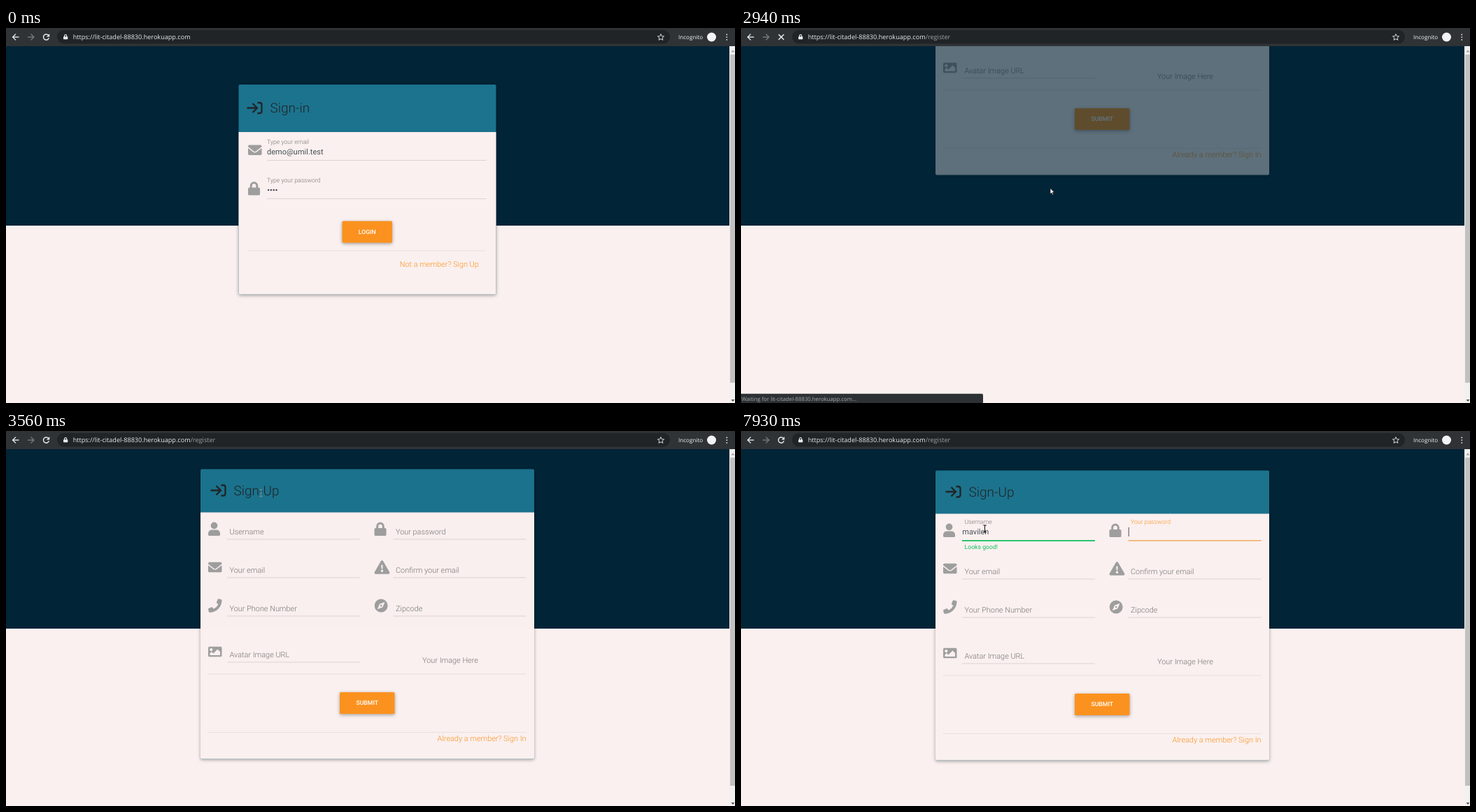
Recreate the animation shown at these times as an HTML page with a canvas. Size 1042 px wide and 537 px high, loop 8000 ms.

```html
<!DOCTYPE html>
<html lang="en">
<head>
<meta charset="utf-8">
<title>Sign-up demo</title>
<style>
html, body { margin: 0; width: 100%; height: 100%; overflow: hidden; background: #faf0ef; }
canvas { display: block; }
</style>
</head>
<body>
<canvas id="stage" width="1042" height="537"></canvas>
<script>
const W = 1042, H = 537, LOOP = 8000;
const stage = document.getElementById('stage').getContext('2d');
const layer = Object.assign(document.createElement('canvas'), { width: W, height: H });
const sheet = layer.getContext('2d');

const NAVY = '#022437', PALE = '#faf0ef', TEAL = '#1c738d', ORANGE = '#fb921f';
const GREY = '#757575', ICON = '#9e9e9e', INK = '#495057', GREEN = '#12c05f';
const HAIR = '#e8e0df';
const UI = '"Open Sans", "Noto Sans", sans-serif';
const HOST = 'lit-citadel-88830.herokuapp.com';
const USER = 'mavilen';
const KEYS = [5780, 6610, 6840, 6930, 7070, 7150, 7300];

const ICONS = {
  user: 'M3.75 5a5 5 0 1 0 10 0a5 5 0 1 0-10 0ZM0 18.1V16.4A5.2 5.2 0 0 1 5.2 11.2H12.3A5.2 5.2 0 0 1 17.5 16.4V18.1A1.9 1.9 0 0 1 15.6 20H1.9A1.9 1.9 0 0 1 0 18.1Z',
  lock: 'M0 10.6A1.9 1.9 0 0 1 1.9 8.75H2.8V6a5.95 5.95 0 0 1 11.9 0V8.75H15.6A1.9 1.9 0 0 1 17.5 10.6V18.1A1.9 1.9 0 0 1 15.6 20H1.9A1.9 1.9 0 0 1 0 18.1ZM5.9 8.75H11.6V6a2.85 2.85 0 0 0-5.7 0Z',
  mail: 'M0 4.4A1.9 1.9 0 0 1 1.9 2.5H18.1A1.9 1.9 0 0 1 20 4.4V5.2L11.6 11.8Q10 13 8.4 11.8L0 5.2ZM0 7.2L7.6 13Q10 14.6 12.4 13L20 7.2V15.6A1.9 1.9 0 0 1 18.1 17.5H1.9A1.9 1.9 0 0 1 0 15.6Z',
  warn: 'M9.6 .95A1.9 1.9 0 0 1 12.9 .95L22.2 17.2A1.9 1.9 0 0 1 20.6 20H1.9A1.9 1.9 0 0 1 .3 17.2ZM10 6.6H12.5L12.1 12.6H10.4ZM9.5 15.3a1.75 1.75 0 1 0 3.5 0a1.75 1.75 0 1 0-3.5 0Z',
  phone: 'M19.3 1L15.2 .05A.95 .95 0 0 0 14.1 .6L12.2 5A.94 .94 0 0 0 12.5 6.1L14.9 8A14.5 14.5 0 0 1 8 14.9L6.1 12.5A.94 .94 0 0 0 5 12.2L.6 14.1A.95 .95 0 0 0 .05 15.2L1 19.3A.94 .94 0 0 0 1.9 20A18.1 18.1 0 0 0 20 1.9A.94 .94 0 0 0 19.3 1Z',
  compass: 'M0 10a9.7 9.7 0 1 0 19.4 0a9.7 9.7 0 1 0-19.4 0ZM15.2 4.6L12 12.2L4.2 15.4L7.4 7.6ZM8.4 10a1.3 1.3 0 1 0 2.6 0a1.3 1.3 0 1 0-2.6 0Z',
  image: 'M1.9 2.5H18.1A1.9 1.9 0 0 1 20 4.4V15.6A1.9 1.9 0 0 1 18.1 17.5H1.9A1.9 1.9 0 0 1 0 15.6V4.4A1.9 1.9 0 0 1 1.9 2.5ZM2.2 6.9a2.2 2.2 0 1 0 4.4 0a2.2 2.2 0 1 0-4.4 0ZM2.5 15V12.5L5 10L7.5 12.5L13.75 6.25L17.5 10V15Z',
  arrow: 'M0 0V8.3L2 6.5L3.3 9.5L4.6 8.9L3.3 6H6Z',
  hand: 'M3 6.8V1.2a1 1 0 0 1 2 0V4.8l3.6 .8q1 .3 1 1.4V9.2L8.4 12.5H3.6L.5 8.2q-.4-1 .8-1.2Z',
  star: 'M0-4.6L1.3-1.5L4.6-1.3L2.1 .9L2.9 4.1L0 2.4L-2.9 4.1L-2.1 .9L-4.6-1.3L-1.3-1.5Z',
  enter: 'M0 9H14.5M8 2.5L14.5 9L8 15.5M15 1.5H18Q21 1.5 21 4.5V13.5Q21 16.5 18 16.5H15'
};
for (const k in ICONS) ICONS[k] = new Path2D(ICONS[k]);

const clamp = v => Math.max(0, Math.min(1, v));
const ramp = (t, from, span) => clamp((t - from) / span);
const mix = (a, b, k) => a + (b - a) * k;

// Progress in n hard steps from time a to time b.
const steps = (t, a, b, n) => clamp(Math.floor((t - a) / (b - a) * (n - 1) + 1e-6) / (n - 1));

// cubic-bezier(.25, .1, .25, 1)
function ease(x) {
  const at = (u, p, q) => 3 * u * (1 - u) ** 2 * p + 3 * u * u * (1 - u) * q + u ** 3;
  let lo = 0, hi = 1;
  for (let i = 0; i < 24; i++) {
    const mid = (lo + hi) / 2;
    if (at(mid, .25, .25) < x) lo = mid; else hi = mid;
  }
  return at(lo, .1, 1);
}

function text(g, s, x, y, size, color, weight = 300, align = 'left', family = 'Roboto, sans-serif') {
  g.font = `${weight} ${size}px ${family}`;
  g.textRendering = 'geometricPrecision';
  g.textAlign = align;
  g.fillStyle = color;
  g.fillText(s, x, y);
}

const ui = (s, x, y, size, color) => text(stage, s, x, y, size, color, 400, 'left', UI);

function box(g, x, y, w, h, color, r = 0) {
  g.fillStyle = color;
  g.beginPath();
  g.roundRect(x, y, w, h, r);
  g.fill();
}

function raised(g, x, y, w, h, color, r, blur = 5, alpha = .35) {
  g.save();
  g.shadowColor = `rgba(0,0,0,${alpha})`;
  g.shadowBlur = blur;
  g.shadowOffsetY = 1.4;
  box(g, x, y, w, h, color, r);
  g.restore();
}

function line(g, color, width, ...pts) {
  g.strokeStyle = color;
  g.lineWidth = width;
  g.beginPath();
  for (let i = 0; i < pts.length; i += 2) g.lineTo(pts[i], pts[i + 1]);
  g.stroke();
}

function icon(g, name, x, y, fill = ICON, stroke = null, width = 1, scale = .975) {
  g.save();
  g.translate(x, y);
  g.scale(scale, scale);
  if (fill) { g.fillStyle = fill; g.fill(ICONS[name], 'evenodd'); }
  if (stroke) { g.strokeStyle = stroke; g.lineWidth = width; g.stroke(ICONS[name]); }
  g.restore();
}

const rule = (g, x, y, w, color = '#dcd5d4') => box(g, x, y, w, 1, color);

function label(g, s, x, y, up, color) {
  text(g, s, x, y - mix(7, 24, up), mix(10.9, 8.7, up), color);
}

function card(g, x, y, w, h, head, title, titleX) {
  raised(g, x, y, w, h, TEAL, 2);
  box(g, x, y + head, w, h - head, PALE, [0, 0, 2, 2]);
  const mid = y + head / 2;
  icon(g, 'enter', titleX - 33, mid - 9.5, null, '#212529', 2.3, 1);
  text(g, title, titleX, mid + 6, 19, '#212529');
}

function button(g, s, x, y, w) {
  raised(g, x, y, w, 31, ORANGE, 1.5);
  text(g, s, x + w / 2, y + 18.4, 8.7, '#fff', 500, 'center');
}

function signIn(g, t) {
  card(g, 332.5, 81, 368, 300.5, 68, 'Sign-in', 377.5);
  icon(g, 'mail', 346, 165);
  icon(g, 'lock', 346, 220);
  label(g, 'Type your email', 373, 189.5, 1, GREY);
  text(g, 'demo@umil.test', 373, 181, 11, INK, 400);
  label(g, 'Type your password', 373, 244.5, 1, GREY);
  for (let i = 0; i < 4; i++) box(g, 373.8 + i * 3.8, 230.7, 2.6, 2.6, INK, 1.3);
  rule(g, 373, 189, 313.5);
  rule(g, 373, 244, 313.5);
  button(g, 'LOGIN', 480.5, 276.5, 71.5);
  rule(g, 346, 318.5, 340, HAIR);
  text(g, 'Not a member? Sign Up', 675.8, 342, 10.9, t < 700 ? ORANGE : '#1264bb', 300, 'right');
}

function signUp(g, t) {
  const L = 316, R = 553.5, lineW = 190;
  const userUp = ramp(t, 4250, 240), passUp = ramp(t, 7780, 150);
  const userOn = t >= 4250 && t < 7780;

  card(g, 278, 56.5, 477, 415, 62, 'Sign-Up', 325.5);
  [['user', 289, 132.5], ['lock', 526.5, 132.5], ['mail', 289, 187.3], ['warn', 526.5, 187.3],
   ['phone', 289, 242.3], ['compass', 526.7, 242.3], ['image', 289, 308.3]]
    .forEach(i => icon(g, ...i));

  [['Your email', L, 212], ['Confirm your email', R, 212], ['Your Phone Number', L, 267],
   ['Zipcode', R, 267], ['Avatar Image URL', L, 333]].forEach(([s, x, y]) => {
    label(g, s, x + 3.5, y, 0, GREY);
    rule(g, x, y - .5, lineW);
  });
  rule(g, L, 156.5, lineW);
  rule(g, R, 156.5, lineW);
  label(g, 'Username', L + 3.5, 157, userUp, userOn ? ORANGE : GREY);
  label(g, 'Your password', R + 3.5, 157, passUp, t >= 7780 ? ORANGE : GREY);

  g.globalAlpha = userOn ? ramp(t, 4250, 320) : t >= 7780 ? 1 : 0;
  box(g, L, 156.3, lineW, 1.6, userOn ? ORANGE : GREEN);
  g.globalAlpha = ramp(t, 7740, 300);
  box(g, R, 156.3, lineW, 1.4, ORANGE);
  g.globalAlpha = 1;

  const typed = USER.slice(0, KEYS.filter(k => t >= k).length);
  text(g, typed, L + .3, 148.3, 11, INK, 400);
  const typedW = g.measureText(typed).width;
  const blinkOn = t < 4890 || (t >= 5430 && t < 6290) || t >= 6610;
  if (userOn && blinkOn) box(g, L + typedW + .2, 138, 1, 13, INK);
  if (t >= 7780) {
    box(g, R + .2, 138, 1, 13, INK);
    text(g, 'Looks good!', L + 3.5, 169, 8.7, GREEN, 400);
  }

  text(g, 'Your Image Here', 635, 334, 10.9, GREY, 300, 'center');
  rule(g, 288.5, 349.5, 455, HAIR);
  button(g, 'SUBMIT', 477, 376, 78.5);
  rule(g, 288.5, 433, 455, HAIR);
  text(g, 'Already a member? Sign In', 743.6, 445.6, 10.9, ORANGE, 300, 'right');

  if (t >= 6290 && t < 6610) {
    raised(g, L, 156.3, 190.5, 36.7, '#fff', 2, 4, .5);
    text(g, 'm+w', 324.3, 177.8, 9.4, '#202124', 400, 'left', UI);
  }
}

function scrollbar(g) {
  box(g, 1034, 26, 8, 511, '#f1f1f1');
  box(g, 1035, 38, 7, 470, '#c1c1c1');
  g.fillStyle = '#a0a0a0';
  g.fill(new Path2D('M1036.5 34.5H1041.5L1039 31.5Z'));
  g.fillStyle = '#505050';
  g.fill(new Path2D('M1036.5 532H1041.5L1039 535Z'));
}

function toolbar(g, loading, register) {
  box(g, 0, 0, W, 26, '#2f3336');
  box(g, 73, 3, 876, 19.5, '#202427', 9.75);
  const arrow = (x, d, c) => {
    line(g, c, 1.3, x - 4.5 * d, 13, x + 4.5 * d, 13);
    line(g, c, 1.3, x, 8.6, x + 4.4 * d, 13, x, 17.4);
  };
  arrow(14, -1, '#f1f3f4');
  arrow(35.5, 1, '#7c8083');
  if (loading) {
    line(g, '#f1f3f4', 1.4, 53.7, 9.2, 61.3, 16.8);
    line(g, '#f1f3f4', 1.4, 61.3, 9.2, 53.7, 16.8);
  } else {
    g.strokeStyle = g.fillStyle = '#f1f3f4';
    g.lineWidth = 1.4;
    g.beginPath();
    g.arc(57.5, 13, 4, .3, 5.5);
    g.stroke();
    g.fill(new Path2D('M62.2 8.2V12.6H57.8Z'));
  }
  icon(g, 'lock', 82, 9, '#e8eaed', null, 1, .36);
  ui(`https://${HOST}`, 95.7, 16.3, 9.1, '#e8eaed');
  if (register) ui('/register', 95.7 + g.measureText(`https://${HOST}`).width, 16.3, 9.1, '#9aa0a6');
  icon(g, 'star', 936, 13.2, null, '#dadce0', 1, 1);
  ui('Incognito', 961, 16, 8.1, '#f1f3f4');
  box(g, 1002, 6.5, 13, 13, '#f1f3f4', 6.5);
  for (let i = -1; i < 2; i++) box(g, 1029.4, 12.2 + i * 3.7, 1.8, 1.8, '#f1f3f4', .9);
}

function status(g, t) {
  if (t < 740 || t >= 3400) return;
  const s = t < 1520 ? `https://${HOST}/register` : t < 2160 ? 'Resolving host...' : `Waiting for ${HOST}...`;
  g.globalAlpha = mix(.4, 1, ramp(t, 740, 190));
  box(g, 0, 523.7, 346, 14, '#2d3134', [0, 2, 0, 0]);
  ui(s, .7, 534.3, 7.75, '#a5aaae');
  g.globalAlpha = 1;
}

const MOVES = [
  [70, 840, 12, 638, 338],
  [2390, 2620, 4, 442, 229.5],
  [3240, 3560, 5, 364, 89],
  [3640, 4020, 6, 348, 140]
];

function pointer(g, t) {
  if (t < 70) return;
  let x = 911, y = 505;
  for (const [a, b, n, toX, toY] of MOVES) {
    const k = steps(t, a, b, n);
    x = mix(x, toX, k);
    y = mix(y, toY, k);
  }
  if (t >= 3480) {
    const c = y < 118 ? '#7d8d92' : '#111';
    line(g, c, 1, x + .5, y - 5, x + .5, y + 5);
    line(g, c, 1, x - 1.8, y - 5, x + 2.8, y - 5);
    line(g, c, 1, x - 1.8, y + 5, x + 2.8, y + 5);
  } else if (t >= 700 && t < 2390) {
    icon(g, 'hand', x - 3.3, y, '#fff', '#111', .9, 1);
  } else {
    icon(g, 'arrow', x, y, '#fff', '#111', .7, 1);
  }
}

// The card drops in from above while fading in.
function dropIn(t) {
  if (t < 2849) return .008;
  const held = t < 3640 ? 2770 + 79 * Math.floor((t - 2770) / 79) : t;
  return ease(ramp(held, 2710, 935));
}

function draw(t) {
  const g = stage;
  box(g, 0, 0, W, H, PALE);
  box(g, 0, 26, W, 257, NAVY);
  if (t < 2000) {
    signIn(g, t);
  } else if (t >= 2770) {
    const p = dropIn(t);
    sheet.clearRect(0, 0, W, H);
    signUp(sheet, t);
    g.globalAlpha = p;
    g.drawImage(layer, 0, -415 * (1 - p));
    g.globalAlpha = 1;
  }
  if (t < 2000 || t >= 2770) scrollbar(g);
  toolbar(g, t >= 1520 && t < 3000, t >= 1520);
  status(g, t);
  pointer(g, t);
}

const start = performance.now();
function tick() {
  draw((performance.now() - start) % LOOP);
  requestAnimationFrame(tick);
}
tick();
</script>
</body>
</html>
```
